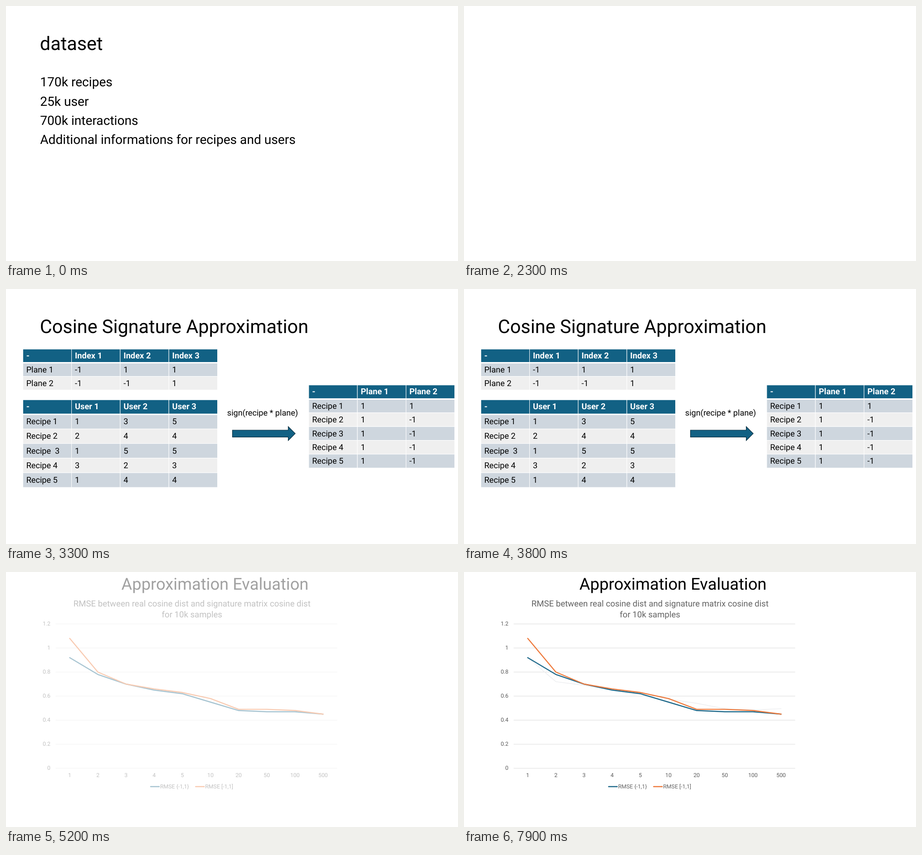
An HTML page for the animation above (8000 ms loop, 997 by 562 pixels).

```html
<!DOCTYPE html>
<html lang="en">
<head>
<meta charset="utf-8">
<title>Slides</title>
<style>
  html, body { margin: 0; width: 100%; height: 100%; overflow: hidden; background: #fff; }
  svg { display: block; width: 100vw; height: 100vh; font-family: Roboto, "Open Sans", sans-serif; }
  text { white-space: pre; text-rendering: geometricPrecision; }
  .title { font-size: 41.4px; }
  .body { font-size: 28.15px; }
  .cell { font-size: 18.1px; }
  .head { font-size: 18.3px; font-weight: 700; fill: #fff; }
  .mid { text-anchor: middle; }
  .end { text-anchor: end; }
  .eval { font-size: 36.3px; }
  .sub { font-size: 18.6px; fill: #595959; }
  .axis { font-size: 12.3px; fill: #595959; }
  .line { fill: none; stroke-width: 2.4; stroke-linecap: round; stroke-linejoin: round; }
</style>
</head>
<body>
<svg viewBox="0 0 997 562">
  <g id="data"></g>
  <g id="tables" opacity="0"></g>
  <g id="chart" opacity="0"></g>
</svg>
<script>
const LOOP = 8000;
const BLUE = '#126184', ORANGE = '#ed7230';
const $ = id => document.getElementById(id);

function add(parent, tag, attrs = {}, content) {
  const el = document.createElementNS('http://www.w3.org/2000/svg', tag);
  for (const key in attrs) el.setAttribute(key, attrs[key]);
  if (content !== undefined) el.textContent = content;
  return parent.appendChild(el);
}
const text = (parent, cls, x, y, str) => add(parent, 'text', { class: cls, x, y }, str);

function drawData(g) {
  text(g, 'title', 74.8, 97, 'dataset');
  ['170k recipes', '25k user', '700k interactions',
   'Additional informations for recipes and users']
    .forEach((s, i) => text(g, 'body', 75.2, 177.4 + i * 42.2, s));
}

function table(g, x, y, headH, rowH, rows) {
  const colW = 107.3;
  rows.forEach((row, r) => {
    const top = r ? y + headH + (r - 1) * rowH : y;
    const fill = r ? (r % 2 ? '#ced6de' : '#efefef') : BLUE;
    row.split('|').forEach((str, c) => {
      const left = x + c * colW;
      add(g, 'rect', {
        x: left, y: top, width: colW, height: r ? rowH : headH, fill, stroke: '#fff'
      });
      text(g, r ? 'cell' : 'head', left + 7.4, top + (r ? 11.2 + rowH / 3 : 20.6), str);
    });
  });
  add(g, 'rect', {
    x, y: y + headH - 1.5, width: colW * rows[0].split('|').length, height: 3, fill: '#fff'
  });
}

function drawTables(g) {
  text(g, 'title', 74.8, 97, 'Cosine Signature Approximation');
  table(g, 37.3, 132.6, 29.9, 30,
    ['-|Index 1|Index 2|Index 3', 'Plane 1|-1|1|1', 'Plane 2|-1|-1|1']);
  table(g, 37.3, 244.2, 32, 32.2,
    ['-|User 1|User 2|User 3', 'Recipe 1|1|3|5', 'Recipe 2|2|4|4',
     'Recipe  3|1|5|5', 'Recipe 4|3|2|3', 'Recipe 5|1|4|4']);
  table(g, 667.8, 211.7, 30.7, 30.4,
    ['-|Plane 1|Plane 2', 'Recipe 1|1|1', 'Recipe 2|1|-1',
     'Recipe 3|1|-1', 'Recipe 4|1|-1', 'Recipe 5|1|-1']);
  text(g, 'cell', 487.8, 279, 'sign(recipe * plane)');
  add(g, 'path', {
    d: 'M499.5 311H622.5V303.3L638 318.6L622.5 334V326.3H499.5Z',
    fill: BLUE, stroke: '#0b2f40', 'stroke-width': 1.2
  });
}

function drawChart(g) {
  const px = i => 140.5 + i * 62.1;
  const py = v => 432.5 - v * 265;
  const curve = (parent, stroke, values) => add(parent, 'polyline', {
    class: 'line', stroke, points: values.map((v, i) => px(i) + ',' + py(v)).join(' ')
  });

  text(g, 'eval mid', 461, 39, 'Approximation Evaluation');
  for (let i = 0; i <= 6; i++) {
    const y = py(i / 5);
    add(g, 'path', { d: `M109.5 ${y}H730.5`, stroke: '#dcdcdc' });
    text(g, 'axis end', 98, y + 3.8, i * 2 / 10);
  }
  [1, 2, 3, 4, 5, 10, 20, 50, 100, 500]
    .forEach((n, i) => text(g, 'axis mid', px(i), 452.3, n));

  const next = curve(g, '#eeeff1', [.92, .72, .69, .655, .63, .575, .54, .495, .485, .495]);
  next.style.strokeWidth = 1.6;

  const plot = add(g, 'g');
  text(plot, 'sub mid', 410.3, 76.3, 'RMSE between real cosine dist and signature matrix cosine dist');
  text(plot, 'sub mid', 410.3, 100, 'for 10k samples');
  curve(plot, BLUE, [.92, .78, .7, .65, .62, .55, .48, .47, .47, .45]);
  curve(plot, ORANGE, [1.08, .8, .7, .66, .63, .58, .49, .49, .48, .45]);
  [[318, BLUE, 'RMSE {-1,1}'], [417.3, ORANGE, 'RMSE [-1,1]']].forEach(([x, stroke, str]) => {
    add(plot, 'path', { class: 'line', d: `M${x + 1} 473H${x + 20}`, stroke });
    text(plot, 'axis', x + 22, 476.8, str);
  });
  return { next, plot };
}

// Each step [ms, opacity] holds until the following one.
function play(el, steps) {
  const all = [...steps, [LOOP, steps[steps.length - 1][1]]];
  el.animate(
    all.map(([ms, opacity]) => ({ offset: ms / LOOP, opacity, easing: 'step-end' })),
    { duration: LOOP, iterations: Infinity });
}
const ramp = (start, levels) => levels.map((v, i) => [start + i * 100, v]);
const fadeIn = start => ramp(start, [.18, .37, .57, .78, 1]);

drawData($('data'));
drawTables($('tables'));
const { next, plot } = drawChart($('chart'));

play($('data'), [[0, 1], ...ramp(1900, [.92, .7, .47, .23, 0])]);
play($('tables'), [[0, 0], ...fadeIn(2800), ...ramp(4200, [.95, .75, .55, .35, .15, 0])]);
play($('chart'), [[0, 0], ...fadeIn(5100)]);
play(next, [[0, 0], [7800, .3], [7900, 1]]);
play(plot, [[0, 1], [7800, .98], [7900, .94]]);
</script>
</body>
</html>
```
